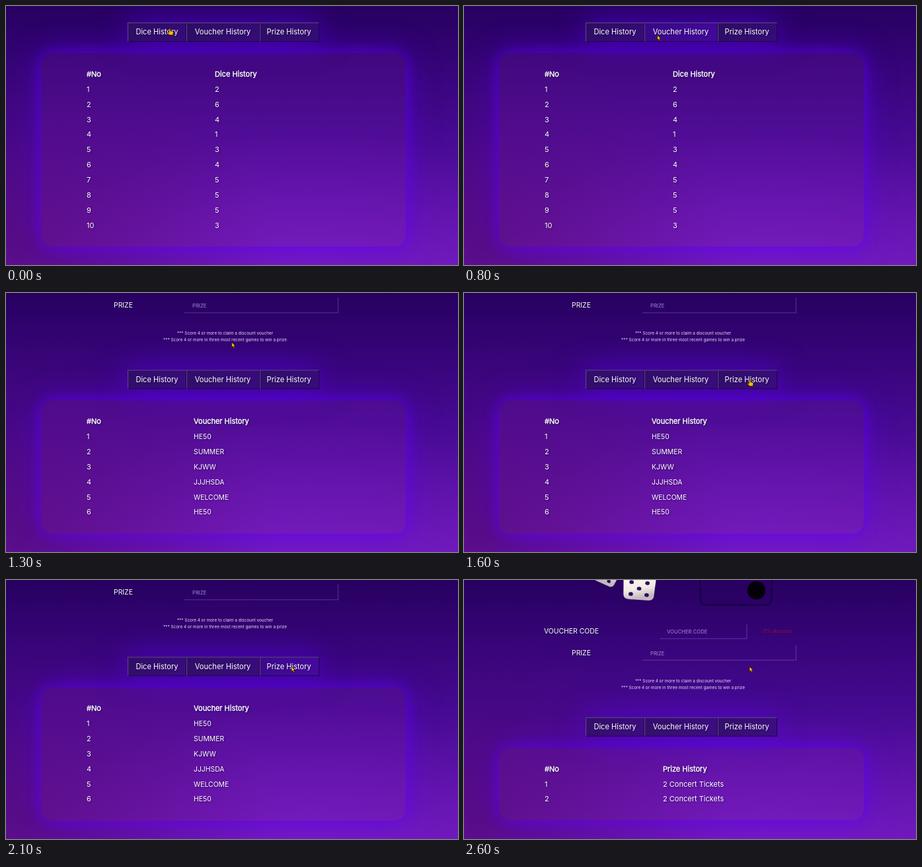
These frames come from a looping animation (684 by 392 pixels, 2.7 s). An HTML page:

```html
<!DOCTYPE html>
<html lang="en">
<head>
<meta charset="utf-8">
<title>Dice game history</title>
<style>
  html, body { margin: 0; width: 100%; height: 100%; overflow: hidden; }
  #stage {
    position: relative; width: 684px; height: 392px; overflow: hidden;
    background:
      radial-gradient(ellipse 55% 75% at 4% 92%, rgba(75, 4, 90, .5), transparent),
      radial-gradient(ellipse 60% 55% at 68% 104%, rgba(140, 34, 220, .35), transparent),
      linear-gradient(#270060, #450990 48%, #6a17b6);
  }
  #page { position: absolute; left: 0; top: 0; width: 684px; height: 392px; }
  #panel {
    position: absolute; left: 53px; top: 71px; width: 552px; border-radius: 17px;
    background: rgba(130, 32, 175, .17);
    box-shadow: 0 0 20px rgba(100, 0, 255, .5), 0 0 46px rgba(92, 0, 240, .55);
  }
  #tabs {
    position: absolute; left: 184px; top: 25px; width: 290px; height: 29px;
    display: flex; box-shadow: 0 0 46px rgba(88, 0, 235, .72);
  }
  #tabs div {
    box-sizing: border-box; height: 29px; border: 1.5px solid;
    border-color: #5c4a80 #1d0747 #1d0747 #5c4a80;
  }
  svg { position: absolute; left: 0; top: 0; overflow: visible; }
  text { font-family: Inter, sans-serif; font-size: 11px; fill: #fff; }
  .shade { filter: drop-shadow(1px 1px 1px rgba(10, 0, 40, .55)); }
  .head { stroke: #fff; stroke-width: .4px; }
  .caps { font-size: 10.4px; }
  .hint { font-size: 7.7px; fill: #a78ad6; }
  .note { font-size: 6.4px; fill: #e6dcf5; text-anchor: middle; }
  .off { font-size: 7.1px; font-style: italic; fill: #a80c32; }
  .tab { font-size: 11.1px; text-anchor: middle; }
  .edge { fill: none; stroke: rgba(190, 150, 255, .32); }
</style>
</head>
<body>
<div id="stage">
  <div id="page">
    <div id="panel"></div>
    <div id="tabs">
      <div style="width:89px"></div><div style="width:111px"></div><div style="width:90px"></div>
    </div>
    <svg width="684" height="392">
      <g id="form">
        <rect x="357.5" y="-240" width="108" height="95" rx="9" fill="#2a0063" fill-opacity=".35" stroke="#13003c" stroke-width="2"/>
        <circle cx="442.5" cy="-167" r="13.7" fill="#050008"/>
        <path class="edge" d="M428 -116V-94H296M502.5 -84.5V-61.5H270"/>
        <g class="shade">
          <text class="caps" x="121" y="-101.5">VOUCHER CODE</text>
          <text class="caps" x="163" y="-69">PRIZE</text>
        </g>
        <text class="hint" x="307" y="-101.5">VOUCHER CODE</text>
        <text class="hint" x="282" y="-69">PRIZE</text>
        <text class="off" x="453" y="-103">0% discount</text>
        <text class="note" x="331.5" y="-28">*** Score 4 or more to claim a discount voucher</text>
        <text class="note" x="331.5" y="-18">*** Score 4 or more in three most recent games to win a prize</text>
      </g>
      <g class="shade">
        <text class="tab" x="228.5" y="43.3">Dice History</text>
        <text class="tab" x="328" y="43.3">Voucher History</text>
        <text class="tab" x="428.2" y="43.3">Prize History</text>
      </g>
      <g id="table" class="shade"></g>
    </svg>
  </div>
  <svg width="684" height="392">
    <defs>
      <linearGradient id="bone" x2=".3" y2="1">
        <stop offset="0" stop-color="#fffdf8"/>
        <stop offset=".7" stop-color="#f1ebe4"/>
        <stop offset="1" stop-color="#c4b8bd"/>
      </linearGradient>
    </defs>
    <g id="greenDie">
      <path d="M234 -12Q232 8 239 13L257 23Q268 28 279 23L293 15Q299 10 297 -12Z" fill="url(#bone)"/>
      <g fill="#8cc51c">
        <ellipse cx="251" cy="13" rx="6" ry="4.5" transform="rotate(35 251 13)"/>
        <ellipse cx="264" cy="12.5" rx="11" ry="7" transform="rotate(-16 264 12.5)"/>
      </g>
      <path d="M249 10Q260 17 272 9M255 15L269 14" fill="none" stroke="#e4f3bd" stroke-width="1.3"/>
    </g>
    <g id="dice"></g>
    <g id="cursor" stroke="#2b1500" stroke-width=".8" stroke-linejoin="round">
      <path id="arrow" d="M0 0V7.5L1.8 6L3 8.7L4.5 8L3.3 5.4H5.5Z" fill="#f6c500"/>
      <path id="hand" d="M-.8 .8Q.3 -.6 1.3 .8V3.6L5 4.4Q6.2 5 5.8 7L5 10H0L-3 6.3Q-2.8 5 -.8 6Z" fill="#f5bd00"/>
    </g>
  </svg>
</div>
<script>
const LOOP = 2700, STEP = 22.85;
const $ = id => document.getElementById(id);
const views = [
  { title: 'Dice History', x: 316, shift: 0, rows: [2, 6, 4, 1, 3, 4, 5, 5, 5, 3] },
  { title: 'Voucher History', x: 284, shift: 4 * STEP,
    rows: ['HE50', 'SUMMER', 'KJWW', 'JJJHSDA', 'WELCOME', 'HE50'] },
  { title: 'Prize History', x: 301, shift: 8 * STEP, rows: ['2 Concert Tickets', '2 Concert Tickets'] }
];
const tabs = [...$('tabs').children];
let shown = -1;

const clamp = v => Math.max(0, Math.min(1, v));
const ease = v => v * v * (3 - 2 * v);
const mix = (a, b, p) => a + (b - a) * p;

function label(text, x, y, cls) {
  return `<text x="${x}" y="${y}" class="${cls}">${text}</text>`;
}

function showView(i) {
  if (i === shown) return;
  shown = i;
  const v = views[i];
  $('page').style.transform = `translateY(${v.shift}px)`;
  $('panel').style.height = 293 - v.shift + 'px';
  $('table').innerHTML = label('#No', 122, 107, 'head') + label(v.title, v.x, 107, 'head') +
    v.rows.map((r, n) => {
      const y = 107 + STEP * (n + 1);
      return label(n + 1, 122, y, '') + label(r, v.x, y, /^[A-Z]/.test(r) ? 'caps' : '');
    }).join('');
}

function die(x, y, turn, size) {
  const pips = [[-12, -9], [12, -9], [0, 0], [-12, 9], [12, 9]];
  return `<g transform="translate(${x} ${y}) rotate(${turn}) scale(${size})">` +
    '<path d="M-25 -22Q-25 -27 -19 -27H19Q25 -27 25 -21L23 11Q22 17 15 17H-15Q-22 17 -23 11Z" fill="url(#bone)"/>' +
    pips.map(([a, b]) => `<ellipse cx="${a}" cy="${b}" rx="3.4" ry="2.8" fill="#2b0b66"/>`).join('') + '</g>';
}

function drawDice(t) {
  const rolling = t >= 2400;
  $('greenDie').style.display = t >= 2300 && !rolling ? '' : 'none';
  const p = clamp((t - 2300) / 300);
  $('dice').innerHTML = rolling
    ? die(mix(222, 213, p), mix(-20, -9, p), mix(-60, 24, p), .85) +
      die(mix(268, 265, p), mix(6, 13, p), mix(-75, 4, p), 1)
    : '';
}

function drawCursor(t) {
  const a = ease(clamp((t - 400) / 400)), b = ease(clamp((t - 1100) / 500));
  const x = mix(mix(247.5, 292.5, a), 432, b);
  const y = mix(mix(34, 44, a), 131, b);
  const hand = t < 800 || (t < 2100 && x > 384 && y > 116);
  $('cursor').setAttribute('transform', `translate(${x} ${y})`);
  $('hand').style.display = hand ? '' : 'none';
  $('arrow').style.display = hand ? 'none' : '';
  return x;
}

function draw(now) {
  const t = Math.floor(now % LOOP / 100) * 100;
  showView(t < 900 ? 0 : t < 2300 ? 1 : 2);
  const x = drawCursor(t);
  const glow = [
    x < 273 ? clamp(t / 200) : 0,
    t < 900 && x >= 273 ? 1 : t === 900 ? .5 : 0,
    t < 2300 ? clamp((t - 1800) / 300) : 0
  ];
  tabs.forEach((tab, i) => {
    const g = glow[i];
    tab.style.background = `linear-gradient(100deg, rgba(${mix(46, 60, g)}, ${mix(16, 10, g)}, ${mix(98, 142, g)}, .8), ` +
      `rgba(${mix(56, 72, g)}, ${mix(13, 10, g)}, ${mix(122, 166, g)}, .8))`;
  });
  drawDice(t);
}

function tick() {
  draw(performance.now());
  requestAnimationFrame(tick);
}
tick();
</script>
</body>
</html>
```
